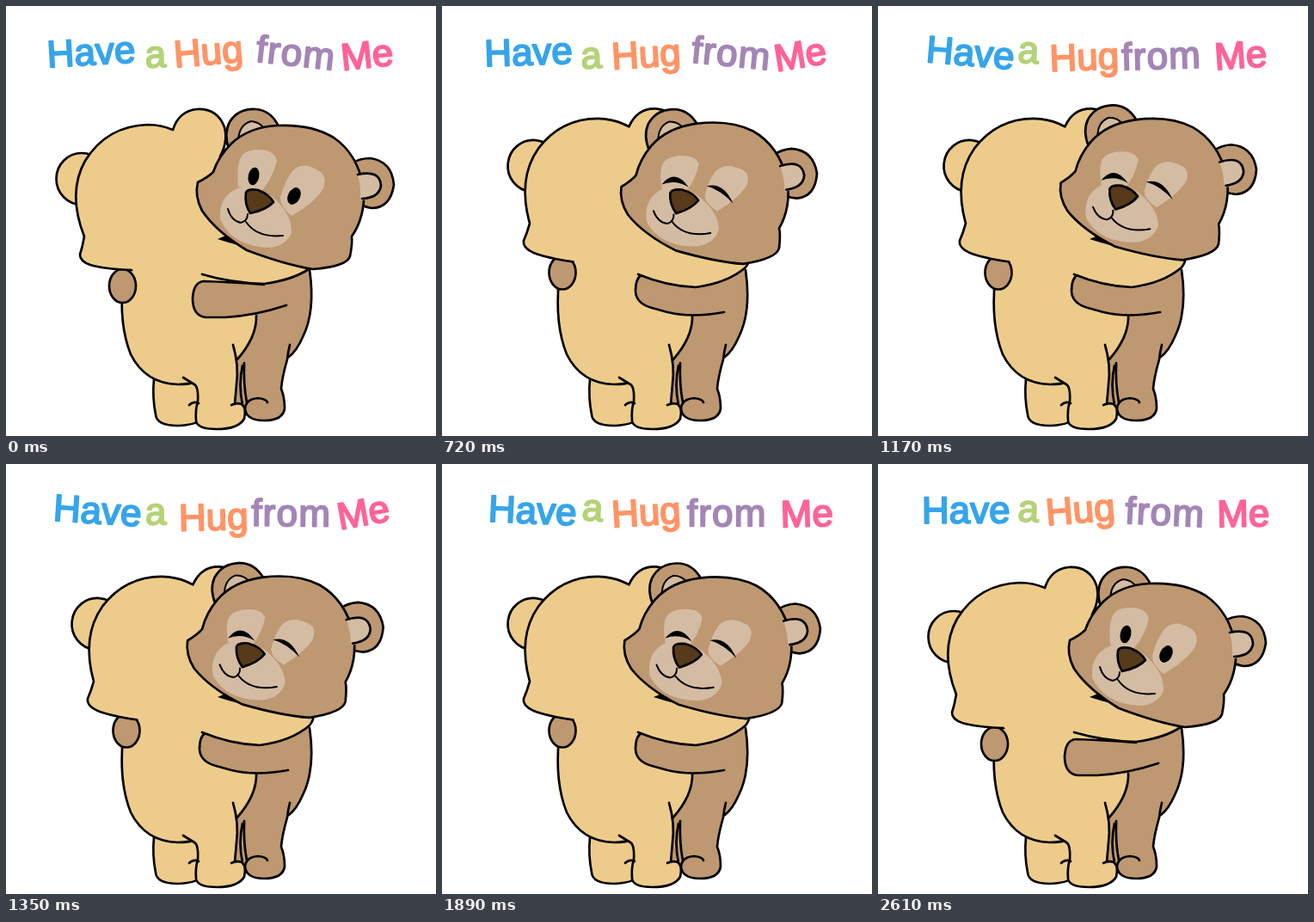
Animation, 500 px wide and 500 px high, one loop 2.7 s. Source, as an HTML page:

```html
<!DOCTYPE html>
<html lang="en">
<head>
<meta charset="utf-8">
<title>Have a Hug from Me</title>
<style>
  html, body { margin: 0; width: 100%; height: 100%; overflow: hidden; background: #fff; }
  svg { display: block; width: 100vw; height: 100vh; }
  path, ellipse { fill: none; stroke: #000; stroke-width: 2.7; stroke-linecap: round; stroke-linejoin: round; }
  .yellow { fill: #edcc8b; }
  .brown { fill: #be9871; }
  .light { fill: #d4bca3; }
  .nose { fill: #563a1a; }
  .dark { fill: #000; }
  .flat { stroke: none; }
  .thin { stroke-width: 2; }
  text { font: 44px "Liberation Sans", Arial, sans-serif; stroke-width: 2; stroke-linejoin: round; }
</style>
</head>
<body>
<svg viewBox="0 0 500 500">
  <g id="words"></g>

  <!-- brown body and legs -->
  <path class="brown flat" d="M270 320L353 307Q360 355 345 385Q338 401 329 408Q322 425 320 445Q324 455 324 468Q322 482 300 482Q281 482 278 470L262 466L262 400Z"/>
  <path d="M353 307Q360 355 345 385Q338 401 329 408M330 394Q328 402 327 411Q321 432 320 445Q324 455 324 468Q322 482 300 482Q279 482 278 468Q279 457 293 456Q303 457 304 461M277 415Q276 440 280 461M275 418Q270 440 275 464"/>

  <!-- yellow body and legs -->
  <path class="yellow" d="M172 434Q170 455 174 475Q175 488 200 488Q220 487 224 482L224 436"/>
  <path class="yellow flat" d="M140 290L134 345Q132 380 145 405Q160 438 200 440L268 412Q292 390 291 360L285 310Z"/>
  <path d="M136 318Q131 370 145 405Q162 439 200 440Q215 440 222 436M291 360Q292 385 268 412"/>
  <path class="yellow flat" d="M206 432L219 440Q224 443 223 460Q220 470 221 482Q222 492 245 492Q270 492 277 480Q280 468 274 464L266 463Q271 418 264 394Z"/>
  <path d="M206 432L219 440Q224 443 223 460Q220 470 221 482Q222 492 245 492Q270 492 277 480Q280 468 274 463Q268 461 262 464M264 394Q271 418 268 440L266 463M213 464Q218 459 224 462"/>

  <!-- brown arm -->
  <ellipse id="hand" class="brown" rx="15.5" ry="19.5"/>
  <path id="brownArm" class="brown"/>

  <g id="yellowHead">
    <ellipse class="yellow" cx="88" cy="201" rx="29.5" ry="30"/>
    <path class="yellow" d="M147 307Q115 306 98 301Q86 297 86 289Q89 280 91 268C78 235 78 205 92 180C108 154 132 139 165 138Q180 138 194 144Q201 122 222 120Q246 119 254 141Q259 160 246 180M242 176L247 186"/>
    <path class="yellow flat" d="M149 310L146 305L130 250L230 150L300 250L228 308Z"/>
  </g>

  <!-- yellow arm -->
  <path class="yellow flat" d="M200 308L228 312L354 302L330 250L220 250Z"/>
  <path id="yellowArm" class="yellow"/>
  <path class="dark flat" d="M246 271L258 266L270 278Q258 275 246 271Z"/>

  <g id="brownHead">
    <path class="brown" d="M259 166Q253 148 260 135Q270 119 290 120Q308 121 317 140"/>
    <path class="light thin" d="M270 156Q271 138 285 134Q296 135 301 144"/>
    <path class="brown" d="M402 183Q411 177 424 177Q449 181 451 208Q447 235 425 235Q418 234 413 231"/>
    <path class="brown" d="M223 205Q235 199 241 193Q247 175 262 160Q282 141 315 139Q355 137 381 153Q409 172 416 212Q418 245 402 268Q403 276 400 291Q396 303 357 306Q325 301 280 284Q244 262 228 238Q219 221 223 205Z"/>
    <path class="light flat" d="M409 196Q435 190 436 209Q434 225 412 226Q413 211 409 196Z"/>
    <path d="M409 196Q435 190 436 209Q434 223 414 224"/>
    <g id="patches">
      <path class="light flat" d="M272 178Q277 166 296 167Q312 168 315 180Q310 200 298 214L270 210Q268 190 272 178Z"/>
      <path class="light flat" d="M333 192Q346 178 367 194Q373 200 369 212Q361 227 332 244Q318 233 319 222Q324 204 333 192Z"/>
    </g>
    <path class="light flat" d="M249 240Q251 218 272 211Q288 207 310 222Q333 242 332 264Q324 281 303 281Q262 278 249 248Z"/>
    <path class="nose" d="M279 217Q281 212 293 214Q306 219 311 228Q303 237 284 241Q277 230 279 217Z"/>
    <path class="thin" d="M258 236Q262 250 273 252Q281 250 281 242M279 251Q292 270 322 267"/>
    <g class="eyes">
      <ellipse class="dark flat" cx="288" cy="198" rx="6.3" ry="10.5" transform="rotate(12 288 198)"/>
      <ellipse class="dark flat" cx="335" cy="221" rx="7" ry="10.5" transform="rotate(27 335 221)"/>
    </g>
    <path class="eyes dark flat" d="M274 201Q287 183 298 203Q286 207 274 201ZM324 219Q335 205 345 228Q334 230 324 219Z"/>
    <path class="eyes dark flat" d="M270 206Q287 188 301 212Q287 201 270 206ZM322 212Q342 209 351 235Q338 218 322 212Z"/>
  </g>
</svg>
<script>
const STEP = 90, STEPS = 30, WORD_CYCLE = 9;
const $ = id => document.getElementById(id);
const lerp = (a, b, t) => a + (b - a) * t;
const wave = (step, peak, period) => Math.cos(2 * Math.PI * (step - peak) / period);

// Smooth 0..1 ramp between two steps
function ramp(step, from, to) {
  const t = Math.max(0, Math.min(1, (step - from) / (to - from)));
  return t * t * (3 - 2 * t);
}

// Blend two paths that share the same commands
function morph(from, to, t) {
  const ends = to.match(/\d+/g);
  let n = 0;
  return from.replace(/\d+/g, v => lerp(+v, +ends[n++], t).toFixed(2));
}

// Every word swings around its resting pose and reaches (dx, dy, turn) at its peak
const words = [
  { label: "Have", color: "#36a5ea", x: 52, y: 68, angle: 1, dx: 3.5, dy: -3.5, turn: 4.5, peak: 4.7 },
  { label: "a", color: "#b5d278", x: 162, y: 69, angle: 0.5, dx: 0, dy: -4, turn: 3.5, peak: 3.2 },
  { label: "Hug", color: "#ff9566", x: 198.5, y: 74.3, angle: -3.3, dx: 3, dy: 3.6, turn: 2, peak: 5.5 },
  { label: "from", color: "#a486b6", x: 286.5, y: 69.5, angle: 2.3, dx: -3, dy: 5, turn: -4, peak: 4.4 },
  { label: "Me", color: "#ff6497", x: 391, y: 75, angle: -6, dx: -3.5, dy: 1.8, turn: -5, peak: 6.8 }
];
for (const word of words) {
  word.el = document.createElementNS("http://www.w3.org/2000/svg", "text");
  word.el.textContent = word.label;
  word.el.setAttribute("fill", word.color);
  word.el.setAttribute("stroke", word.color);
  if (word.label === "from") word.el.setAttribute("letter-spacing", 1.2);
  $("words").append(word.el);
}

const brownArm = [
  "M326 348Q290 360 255 362L232 362Q217 360 217 340Q218 321 230 320Q260 321 300 324",
  "M328 356Q290 363 262 356L244 351Q226 346 225 332Q225 316 232 313Q262 324 300 326"
];
const yellowArm = [
  "M228 312Q262 322 300 323Q332 319 352 306Q354 304 354 300",
  "M228 312Q262 326 295 327Q332 322 353 304Q358 298 358 289"
];
const eyes = document.querySelectorAll(".eyes");

function pose(el, dx, dy, angle, pivot = "0 0") {
  el.setAttribute("transform", `translate(${dx} ${dy}) rotate(${angle} ${pivot})`);
}

function draw() {
  const step = Math.floor(performance.now() / STEP) % STEPS;

  for (const { el, x, y, angle, dx, dy, turn, peak } of words) {
    const swing = wave(step, peak, WORD_CYCLE);
    pose(el, x + dx * swing, y + dy * swing, angle + turn * swing);
  }

  // The yellow bear leans in first, then the brown one nuzzles and sways
  const hug = ramp(step, 0, 5.6) * ramp(step, 29, 22);
  const nuzzle = ramp(step, 4, 8) * ramp(step, 29, 19);
  const sway = -5 - 2 * wave(step, 8, 10);
  const lift = -lerp(3, 8, ramp(step, 8, 14));
  pose($("yellowHead"), 6 * hug, -4 * hug, 6 * hug, "200 310");
  pose($("brownHead"), sway * nuzzle, lift * nuzzle, -4.7 * nuzzle, "320 300");

  $("brownArm").setAttribute("d", morph(...brownArm, hug));
  $("yellowArm").setAttribute("d", morph(...yellowArm, hug));
  $("hand").setAttribute("cx", lerp(135.5, 140, hug));
  $("hand").setAttribute("cy", lerp(325.5, 310, hug));

  const squint = 1 - 0.12 * nuzzle;
  $("patches").setAttribute("transform", `translate(0 ${230 * (1 - squint)}) scale(1 ${squint})`);
  const lids = nuzzle > 0.6 ? 2 : nuzzle > 0.4 ? 1 : 0;
  eyes.forEach((el, i) => el.setAttribute("visibility", i === lids ? "visible" : "hidden"));

  requestAnimationFrame(draw);
}
draw();
</script>
</body>
</html>
```
